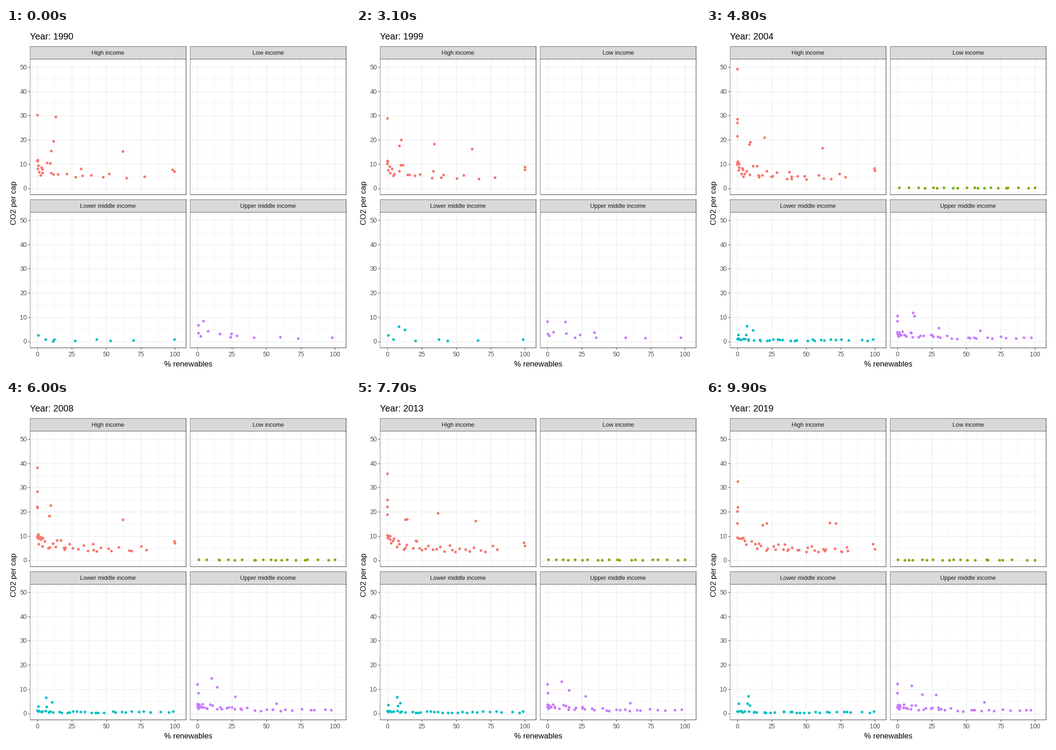
These frames come from a looping animation (748x748 px, 10000 ms). A matplotlib script:

```python
import matplotlib.pyplot as plt
import numpy as np
from matplotlib.animation import FuncAnimation
from matplotlib.patches import Rectangle

SIZE, DPI, FRAMES, STEP = 748, 100, 100, 100
PX = 72 / DPI                      # one pixel in points
X_UNIT, Y_UNIT = 2.995, 5.27       # pixels per data unit
PANEL_W, PANEL_H, STRIP_H = 339, 295, 27
FIRST_YEAR, YEARS, LENGTH = 1990, 29, 9.9
ENTRY = 3.4                        # most countries report from 2000 on
VETERAN_TIMES = (0, 3.1, 6, 9.9)
ENTRANT_TIMES = (4.8, 6, 9.9)
GOLDEN = (5 ** 0.5 - 1) / 2
DARK, SOFT = "#333333", "#7F7F7F"

plt.rcParams["font.family"] = "Liberation Sans"
rng = np.random.default_rng(12)


class Crowd:
    """Countries spread along x by a power curve that changes over time."""

    def __init__(self, early, late, span, skew, level, lift, spread):
        self.early, self.span, self.skew = early, span, skew
        self.level, self.lift, self.spread = level, lift, spread
        self.u = (0.5 + GOLDEN * np.arange(late)) % 1
        self.noise = rng.uniform(-1, 1, late)
        self.drift = rng.normal(0, 1, (YEARS + 2, late, 2))

    def at(self, t):
        year, part = divmod(t / LENGTH * YEARS, 1)
        a, b = self.drift[int(year):int(year) + 2]
        dx, dy = (a + (b - a) * part).T
        x = self.span * self.u ** np.interp(t, (0, 4.8, LENGTH), self.skew)
        x = x + 1.2 * dx * np.clip(x * (100 - x) / 900, 0, 1)
        x = x.clip(0, 100)
        fade = np.exp(-x / 30)
        y = self.level + self.lift * fade
        y = y + self.spread * (0.4 + 0.6 * fade) * self.noise
        y = y * (1 - 0.015 * t) * (1 + 0.04 * dy)
        n = len(x) if t >= ENTRY else self.early
        return np.column_stack([x, y.clip(0.1)])[:n]


class Leader:
    """One country that stands apart, moving through a few key points."""

    def __init__(self, *keys):
        self.entrant = len(keys) == len(ENTRANT_TIMES)
        self.times = ENTRANT_TIMES if self.entrant else VETERAN_TIMES
        self.x, self.y = zip(*keys)

    def at(self, t):
        if self.entrant and t < ENTRY:
            return np.empty((0, 2))
        return np.array([[np.interp(t, self.times, self.x),
                          np.interp(t, self.times, self.y)]])


# name: left, top of strip, colour, movers
PANELS = {
    "High income": (52, 39, "#F8766D", [
        Crowd(25, 37, 84, (3, 2.5, 1.3), 5, 3.6, 3.2),
        Leader((0, 30.2), (0, 28.9), (0, 28.4), (0, 20.3)),
        Leader((13.4, 29.5), (34.1, 18.4), (9.7, 22.7), (71.6, 15.3)),
        Leader((11.6, 19.4), (10, 20.1), (8.8, 18.4), (18.2, 14.6)),
        Leader((10.1, 15.4), (8.6, 17.6), (8.8, 18.4), (21.5, 15.2)),
        Leader((62.2, 15.2), (61.4, 16.3), (62, 16.8), (67.1, 15.4)),
        Leader((98.3, 7.7), (99.8, 8.9), (99.5, 7.9), (98.4, 6.7)),
        Leader((99.5, 6.9), (99.8, 7.7), (100, 7.1), (100, 4.6)),
        Leader((0, 49.2), (0, 38.3), (0.2, 32.5)),
        Leader((0, 27), (0, 22.2), (0.2, 22)),
        Leader((0, 21.6), (0, 21.7), (0, 15.3)),
    ]),
    "Low income": (400, 39, "#7CAE00", [
        Crowd(0, 20, 103, (1, 0.9, 1.1), 0.22, 0, 0.2),
    ]),
    "Lower middle income": (52, 372, "#00BFC4", [
        Crowd(6, 32, 103, (1.3, 1.6, 1.4), 0.65, 0.1, 0.6),
        Leader((0.8, 2.5), (0.8, 2.5), (0.7, 3), (1, 4)),
        Leader((12.4, 0.8), (8.3, 6.1), (6.2, 6.5), (8, 7.2)),
        Leader((11.4, 0.1), (12.6, 4.8), (10.7, 4.6), (7.3, 4)),
        Leader((6.4, 2.7), (6.6, 2.8), (8.9, 3.4)),
    ]),
    "Upper middle income": (400, 372, "#C77CFF", [
        Crowd(10, 37, 103, (1.8, 2.2, 2), 1.3, 2.2, 1.4),
        Leader((0.6, 6.7), (0, 8.3), (0, 12), (0, 12.2)),
        Leader((4.5, 8.4), (13, 8.1), (10.2, 14.5), (10.4, 11.4)),
        Leader((24.7, 3.2), (34, 3.7), (27.5, 6.9), (28, 7.6)),
        Leader((0, 8.5), (0.6, 8.4), (0, 8.4)),
        Leader((12.5, 10.5), (14.2, 11), (17.9, 7.9)),
        Leader((60.1, 4.4), (57.5, 4), (63.2, 4.6)),
    ]),
}

fig = plt.figure(figsize=(SIZE / DPI, SIZE / DPI), dpi=DPI, facecolor="white")
ax = fig.add_axes([0, 0, 1, 1])
ax.set(xlim=(0, SIZE), ylim=(SIZE, 0))
ax.axis("off")


def line(x0, y0, x1, y1, color, width=1, z=4):
    ax.plot([x0, x1], [y0, y1], color=color, lw=width * PX, zorder=z,
            solid_capstyle="butt")


def frame(left, top, height):
    """Outline with softer left and top edges."""
    right, bottom = left + PANEL_W, top + height
    l, t, r, b = left + 0.5, top + 0.5, right + 0.5, bottom + 0.5
    line(l, top, l, bottom + 1, SOFT, z=5)
    line(left, t, right + 1, t, SOFT, z=5)
    line(r, top, r, bottom + 1, DARK, z=5)
    line(left, b, right + 1, b, DARK, z=5)


def label(x, y, text, size, color="black", ha="center", **kw):
    return ax.text(x, y, text, fontsize=size * PX, color=color, ha=ha,
                   va="baseline", **kw)


def to_stage(left, top, x, y):
    return left + 16 + x * X_UNIT, top + 309.5 - y * Y_UNIT


dots = {}
for name, (left, top, color, _) in PANELS.items():
    p_top = top + STRIP_H
    right, bottom = left + PANEL_W, p_top + PANEL_H
    for start, width in ((0.5, 0.65), (0, 1.2)):
        for k in range(5 - (start > 0)):
            x, _ = to_stage(left, top, 25 * (k + start), 0)
            line(x, p_top, x, bottom, "#EBEBEB", width, 2 - start)
        for k in range(6 - (start > 0)):
            _, y = to_stage(left, top, 0, 10 * (k + start))
            line(left, y, right, y, "#EBEBEB", width, 2 - start)
    ax.add_patch(Rectangle((left, top), PANEL_W, STRIP_H, fc="#D9D9D9", lw=0,
                           zorder=4))
    frame(left, p_top, PANEL_H)
    frame(left, top, STRIP_H)
    label(left + 170, top + 18.8, name, 12.95, "#1A1A1A", zorder=6)
    if left < 100:
        for v in range(0, 51, 10):
            _, y = to_stage(left, top, 0, v)
            line(left - 4, y, left, y, DARK)
            label(45.3, y + 4.9, str(v), 13.5, "#4D4D4D", "right")
    if top > 100:
        for v in range(0, 101, 25):
            x, _ = to_stage(left, top, v, 0)
            line(x, bottom + 1, x, bottom + 5, DARK)
            label(x, 713.5, str(v), 13.5, "#4D4D4D")
    dots[name] = ax.scatter([], [], s=(5.9 * PX) ** 2, c=color, lw=0, zorder=3)

title = label(52.5, 25, "", 19.6, ha="left")
label(396, 736, "% renewables", 16.6)
label(22, 380.5, "CO2 per cap", 16.7, rotation=90, rotation_mode="anchor")


def update(i):
    t = i * STEP / 1000
    title.set_text(f"Year: {round(FIRST_YEAR + t / LENGTH * YEARS)}")
    for name, (left, top, _, movers) in PANELS.items():
        x, y = np.vstack([m.at(t) for m in movers]).T
        dots[name].set_offsets(np.column_stack(to_stage(left, top, x, y)))
    return [title, *dots.values()]


anim = FuncAnimation(fig, update, frames=FRAMES, interval=STEP, repeat=True,
                     repeat_delay=0, init_func=lambda: update(0))
plt.show()
```
